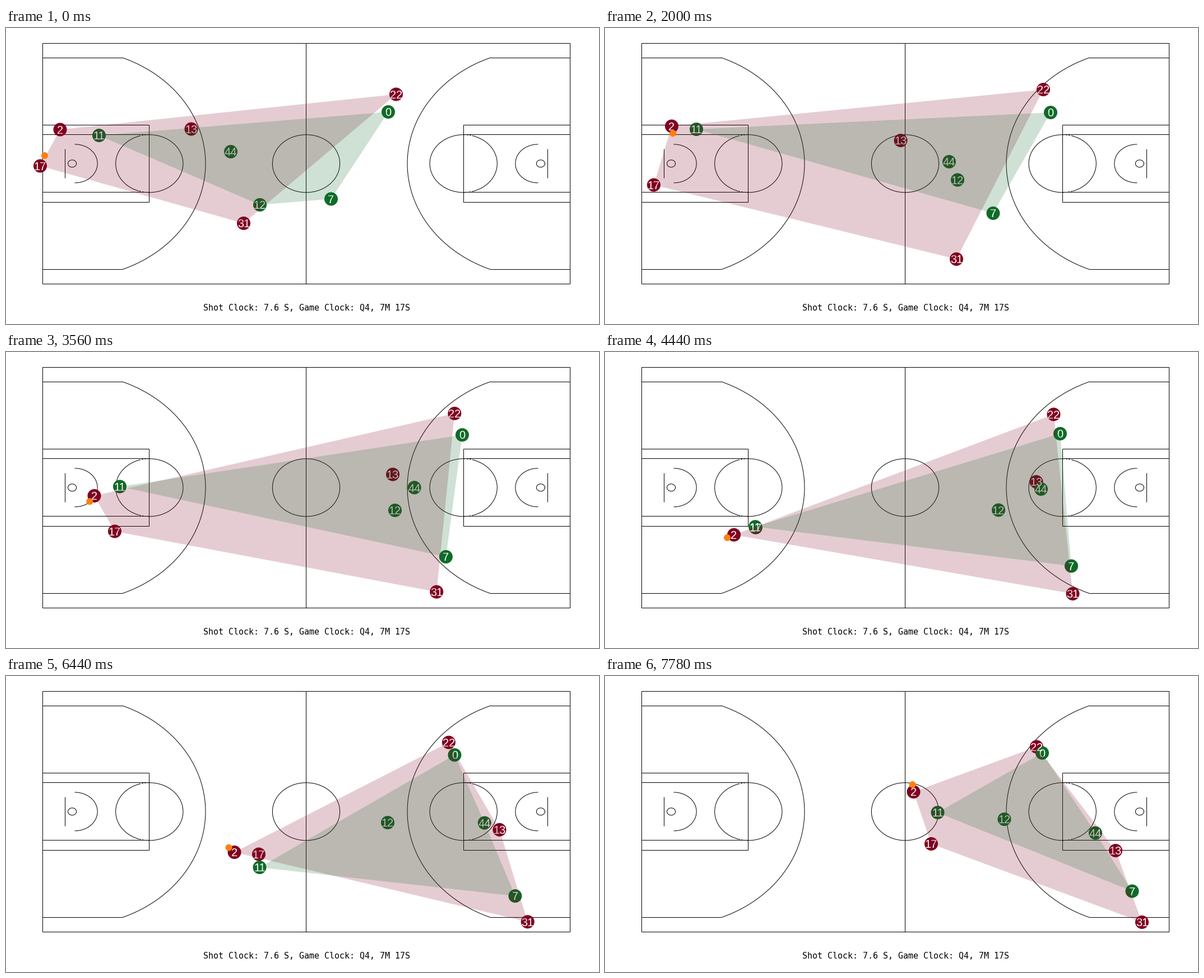
A matplotlib script for the animation above (8 s loop, 1058 px wide and 529 px high).

```python
import matplotlib.pyplot as plt
import numpy as np
from matplotlib.animation import FuncAnimation
from matplotlib.patches import Circle, Polygon, Rectangle

W, H, DPI = 1058, 529, 64
PX = 72 / DPI                       # points per pixel
POSES, TICKS, TICK = 36, 200, 40    # held poses; ticks of TICK ms in one loop
POSE_TIME = TICKS * TICK / POSES
FOOT_X, FOOT_Y = 10.016, 8.6        # pixels per foot
LEFT, RIGHT, TOP, BOTTOM = 65.5, 1006.5, 27.5, 457.5
MID_X, MID_Y = 535.5, 242.3
MAROON, GREEN, ORANGE = "#800020", "#0f6b28", "#ff7f0e"

# Runners are keyed at four poses, players who change direction at six.
KEY_POSES = {4: [0, 9, 20, 35], 6: [0, 9, 16, 25, 29, 35]}

MAROON_KEYS = {
    "2": [(96.5, 181.5), (119, 175.5), (157.5, 257),
          (339, 373.5), (407.5, 315), (550.5, 207)],
    "17": [(61, 246.5), (87, 280.5), (194, 320.5),
           (370, 302.5), (451, 318.5), (582, 300)],
    "13": [(330.5, 180.5), (527.5, 201), (769.5, 232), (911, 312)],
    "31": [(424, 349), (627, 413), (834.5, 432), (958, 440)],
    "22": [(696, 118.5), (782, 110), (800.5, 111.5), (770, 126.5)],
}
GREEN_KEYS = {
    "11": [(166, 192), (163, 181), (203, 240.5),
           (372, 376), (452.5, 342), (593.5, 244)],
    "12": [(453, 316), (629, 271.5), (694, 283),
           (693, 274.5), (681, 262), (712.5, 256)],
    "44": [(401, 221), (614, 239), (778, 245), (875, 280.5)],
    "0": [(682, 150), (795, 151), (812, 146), (780, 137.5)],
    "7": [(580, 305.5), (692.5, 331), (832, 382.5), (940.5, 384.5)],
}


def smooth_path(points):
    """Cubic path through the key points, sampled at every pose."""
    k = np.array(KEY_POSES[len(points)], float)
    p = np.array(points, float)
    slope = np.gradient(p, k, axis=0, edge_order=2)
    t = np.arange(POSES)
    i = np.clip(np.searchsorted(k, t, side="right") - 1, 0, len(k) - 2)
    h = (k[i + 1] - k[i])[:, None]
    u = (t - k[i])[:, None] / h
    return ((1 + 2 * u) * (1 - u) ** 2 * p[i] + u * (1 - u) ** 2 * h * slope[i]
            + u * u * (3 - 2 * u) * p[i + 1] + u * u * (u - 1) * h * slope[i + 1])


def ball_path(passer, handler):
    """Held by the passer, thrown in, then dribbled around the handler."""
    t = np.arange(POSES)[:, None]
    turn = np.radians(80 + 7 * (t - 9))
    dribble = handler + 13 * np.hstack([np.cos(turn), np.sin(turn)])
    flight = np.clip((t - 5) / 3, 0, 1)
    return (1 - flight) * (passer + (8, -18.5)) + flight * dribble


def hull(points):
    """Convex hull by monotone chain."""
    pts = sorted(map(tuple, points))

    def chain(seq):
        out = []
        for x, y in seq:
            while len(out) > 1:
                (ax_, ay), (bx, by) = out[-2:]
                if (bx - ax_) * (y - ay) - (by - ay) * (x - ax_) > 0:
                    break
                out.pop()
            out.append((x, y))
        return out[:-1]

    return chain(pts) + chain(pts[::-1])


fig = plt.figure(figsize=(W / DPI, H / DPI), dpi=DPI, facecolor="white")
ax = fig.add_axes([0, 0, 1, 1])
ax.set_xlim(0, W)
ax.set_ylim(H, 0)
ax.axis("off")
INK = dict(color="black", lw=PX, snap=False, zorder=0)


def crisp(*values):
    """Move coordinates to pixel centres."""
    return np.floor(values) + 0.5


def line(x0, y0, x1, y1):
    x0, y0, x1, y1 = crisp(x0, y0, x1, y1)
    ax.plot([x0, x1], [y0, y1], solid_capstyle="butt", **INK)


def box(x0, y0, x1, y1):
    x0, y0, x1, y1 = crisp(x0, y0, x1, y1)
    ax.add_patch(Rectangle((x0, y0), x1 - x0, y1 - y0, fill=False, **INK))


def arc(x, rx, ry, start=0, end=360, side=1, **style):
    """Elliptic arc on the long axis; angle 0 points away from the baseline."""
    a = np.radians(np.linspace(start, end, 120))
    ax.plot(x + side * rx * np.cos(a), MID_Y + ry * np.sin(a), **INK, **style)


def draw_half(base, side):
    def at(feet):
        return base + side * feet * FOOT_X

    key, hoop = at(19), at(5.25)
    for feet in (8, 6):
        y0, y1 = MID_Y - feet * FOOT_Y, MID_Y + feet * FOOT_Y
        box(min(base, key), y0, max(base, key), y1)
    rx, ry = 6 * FOOT_X, 6 * FOOT_Y
    arc(key, rx, ry, -90, 90, side)
    arc(key, rx, ry, 108, 252, side)
    for start in (90, 252):
        arc(key, rx, ry, start, start + 18, side, linestyle=(0, (3, 2)))

    arc(hoop, 7.5, 6.5)
    line(at(4), MID_Y - 3 * FOOT_Y, at(4), MID_Y + 3 * FOOT_Y)
    arc(at(5.75), 4 * FOOT_X, 4 * FOOT_Y, -90, 90, side)

    rx, ry = 23.75 * FOOT_X, 23.75 * FOOT_Y
    bend = np.degrees(np.arcsin(22 / 23.75))
    arc(hoop, rx, ry, -bend, bend, side)
    corner = hoop + side * rx * np.cos(np.radians(bend))
    for y in (MID_Y - 22 * FOOT_Y, MID_Y + 22 * FOOT_Y):
        line(base, y, corner, y)


box(LEFT, TOP, RIGHT, BOTTOM)
line(MID_X, TOP, MID_X, BOTTOM)
arc(MID_X, 6 * FOOT_X, 6 * FOOT_Y)
draw_half(LEFT, 1)
draw_half(RIGHT, -1)
ax.text(MID_X + 0.5, 505, "Shot Clock: 7.6 S, Game Clock: Q4, 7M 17S",
        ha="center", va="baseline", family="DejaVu Sans Mono",
        size=15 * PX, color="black")


class Team:
    def __init__(self, keys, color, layer):
        self.paths = {name: smooth_path(p) for name, p in keys.items()}
        self.dots = [ax.add_patch(Circle((0, 0), 12, fc=color, lw=0,
                                         zorder=layer)) for _ in keys]
        self.labels = [ax.text(0, 0, name, color="white", ha="center",
                               va="baseline", family="Liberation Sans",
                               size=20 * PX, zorder=3) for name in keys]
        self.area = ax.add_patch(Polygon([(0, 0)] * 3, fc=color, alpha=0.2,
                                         lw=0, zorder=3 + layer))

    def move(self, pose):
        spots = [path[pose] for path in self.paths.values()]
        for (x, y), dot, label in zip(spots, self.dots, self.labels):
            dot.center = x, y
            label.set_position((x, y + 7.3))
        self.area.set_xy(hull(spots))
        return [*self.dots, *self.labels, self.area]


maroon, green = Team(MAROON_KEYS, MAROON, 1), Team(GREEN_KEYS, GREEN, 2)
ball = ax.add_patch(Circle((0, 0), 6, fc=ORANGE, lw=0, zorder=6))
ball_spots = ball_path(maroon.paths["17"], maroon.paths["2"])


def update(tick):
    # A pose that begins within this tick is shown for all of it.
    pose = int((tick + 0.75) * TICK / POSE_TIME)
    ball.center = tuple(ball_spots[pose])
    return maroon.move(pose) + green.move(pose) + [ball]


anim = FuncAnimation(fig, update, frames=TICKS, interval=TICK,
                     repeat=True, repeat_delay=0, blit=False)
plt.show()
```
